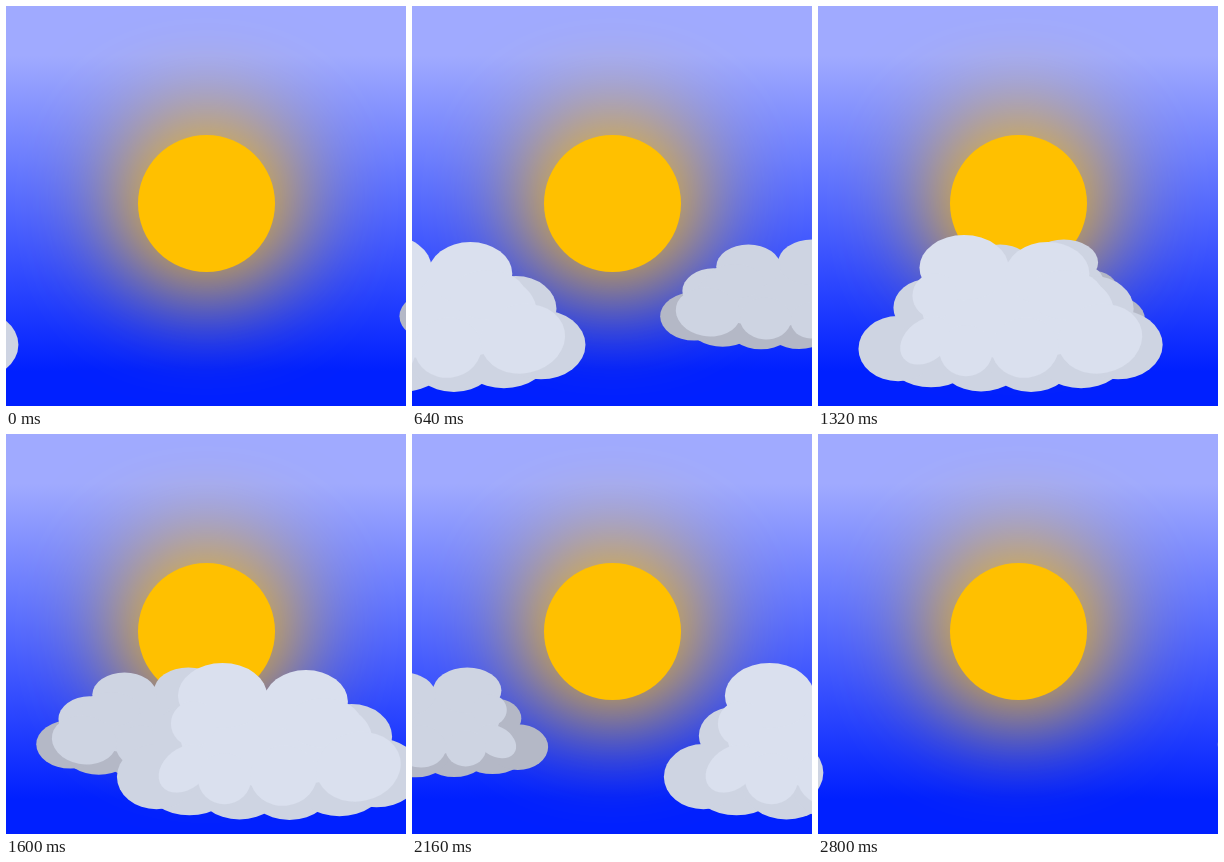
An HTML page with a canvas that plays this animation: 400x400 px, repeating every 2.84 s.

```html
<!DOCTYPE html>
<html>
<head>
<meta charset="utf-8">
<title>Sun and clouds</title>
<style>
  html, body { margin: 0; width: 100%; height: 100%; overflow: hidden; }
  .sky {
    position: relative; width: 400px; height: 400px; overflow: hidden;
    background: linear-gradient(#a0aaff 50px, #0020ff 365px);
  }
  .sun {
    position: absolute; left: 131.7px; top: 129.2px; width: 137px; height: 137px;
    border-radius: 50%; background: #ffc000; box-shadow: 0 0 100px 20px #ffc000;
  }
  canvas { position: absolute; left: 0; top: 0; }
</style>
</head>
<body>
<div class="sky">
  <div class="sun"></div>
  <canvas width="400" height="400"></canvas>
</div>
<script>
const ctx = document.querySelector('canvas').getContext('2d');
const SIDES = [-1, 1];
const EDGE = 0.6; // lets neighbouring puffs overlap slightly

function puff(x, y, rx, ry, tilt = 0) {
  ctx.beginPath();
  ctx.ellipse(x, y, rx + EDGE, ry + EDGE, tilt, 0, 2 * Math.PI);
  ctx.fill();
}

// Shaded underside: four scallops between two shoulders, right side larger.
function drawRim(rim, crown) {
  ctx.fillStyle = rim;
  puff(159, 330, 130, 48);
  for (let i = 0; i < 4; i++) puff(72 + 50 * i, 351, 44, 30 + 5 * Math.sin(i * Math.PI / 3.2));
  for (const s of SIDES) puff(149 + 110 * s, 341 - 2 * s, 41.5 + 2.5 * s, 33 + s);
  for (const s of SIDES) {
    if (s > 0) ctx.fillStyle = crown;
    puff(151.5 + 82.5 * s, 302.5 + s / 2, 37 + 3 * s, 30 + 2 * s);
  }
}

// Lit part: two domes, two cheeks, and a chain of touching, growing puffs below.
function drawBody(color) {
  ctx.fillStyle = color;
  puff(159, 305, 95, 48);
  for (const s of SIDES) {
    puff(146.7 + 41.7 * s, 265 + 3 * s, 42.7 - 1.3 * s, 31.5 - s / 2);
    puff(141 + 65 * s, 289.5 - s / 2, 29.5 + 7.5 * s, 23 + s);
  }
  puff(67, 335, 28, 20, -0.66);
  let x = 81;
  for (let i = 0; i < 3; i++) {
    const r = 26 * 1.27 ** i;
    x += r;
    puff(x, 345 - 3 * i * i, r, 25 + 4.5 * i, -0.1 * i);
    x += r;
  }
}

function drawCloud(x, y, scaleX, scaleY, rim, body, crown) {
  ctx.setTransform(scaleX, 0, 0, scaleY, x, y);
  drawRim(rim, crown);
  drawBody(body);
}

const LOOP = 2840, STEP = 40, CROSSING = 2828, WRAP = 2775;
const LIGHT = '#dae0ee', MID = '#ced4e2', DARK = '#b4b8c6';
const start = performance.now();

function draw() {
  const elapsed = (performance.now() - start) % LOOP;
  let t = Math.floor(elapsed / STEP) * STEP;
  if (t > WRAP) t -= CROSSING; // both clouds are off stage and re-enter
  ctx.resetTransform();
  ctx.clearRect(0, 0, 400, 400);
  // The far cloud is the same shape, mirrored and smaller.
  drawCloud(626 - 0.227 * t, 73, -0.766, 0.7, DARK, MID, MID);
  drawCloud(-291.2 + 0.2517 * t, -0.3, 1, 1, MID, LIGHT, MID);
  requestAnimationFrame(draw);
}
draw();
</script>
</body>
</html>
```
